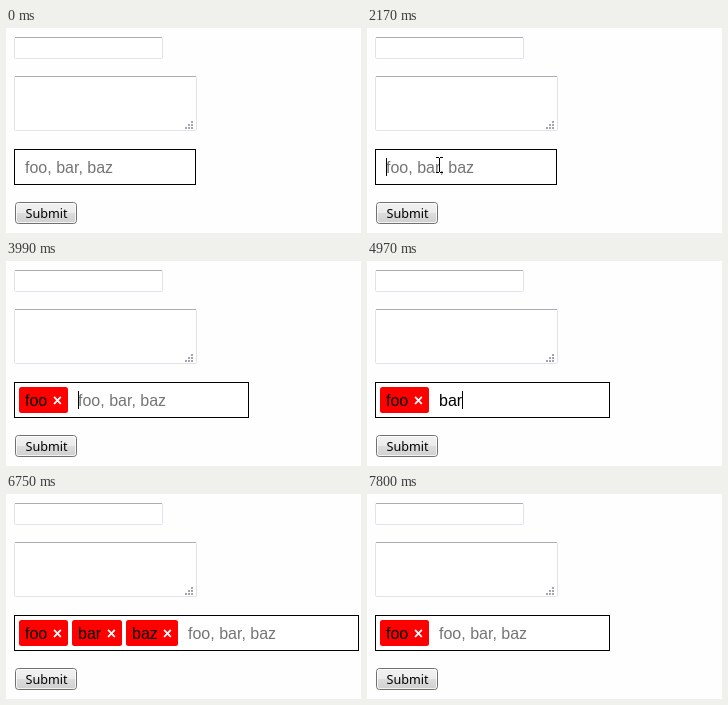
Recreate the animation shown at these times as an HTML page. Size 355x205 px, loop 8000 ms.

```html
<!DOCTYPE html>
<html lang="en">
<head>
<meta charset="utf-8">
<title>Tag input</title>
<style>
  html, body { margin: 0; width: 100%; height: 100%; overflow: hidden; background: #fefefe; }
  svg { display: block; width: 355px; height: 205px; }
  text { font: 16px "Liberation Sans", Arial, sans-serif; white-space: pre; }
  .close { font-weight: bold; fill: #fff; }
  .label { font: 12.6px "Noto Sans", sans-serif; }
  .crisp { shape-rendering: crispEdges; }
</style>
</head>
<body>
<svg viewBox="0 0 355 205">
  <defs>
    <linearGradient id="face" x2="0" y2="1">
      <stop offset="0" stop-color="#f2f2f2"/>
      <stop offset=".5" stop-color="#ebebeb"/>
      <stop offset=".5" stop-color="#dddddd"/>
      <stop offset="1" stop-color="#cfcfcf"/>
    </linearGradient>
  </defs>

  <g fill="#fff" stroke="#e2e3ea">
    <rect x="8.5" y="9.5" width="148" height="21" rx="1"/>
    <rect x="8.5" y="48.5" width="182" height="54" rx="1"/>
    <path d="M9 9.5H156M9 48.5H190" stroke="#abadb3"/>
  </g>
  <path id="grip" class="crisp" fill="#a5a5b0"/>

  <rect x="9.5" y="174.5" width="61" height="21" rx="3" fill="url(#face)" stroke="#707070"/>
  <rect x="10.5" y="175.5" width="59" height="19" rx="2" fill="none" stroke="#fff" stroke-opacity=".75"/>
  <text class="label" x="19.5" y="190">Submit</text>

  <rect id="field" class="crisp" x="8.5" y="121.5" height="35" fill="#fff" stroke="#000"/>
  <g id="tags"></g>
  <text id="entry" y="145"></text>
  <rect id="caret" class="crisp" y="130" width="1" height="18"/>

  <path id="arrow" d="M.5 .5V16.5L4.2 13L6.8 18.5L9 17.5L6.5 12H11.5Z" fill="#fff" stroke="#000"/>
  <path id="beam" class="crisp" d="M-3.5 -7.5H-.5M.5 -7.5H3.5M-3.5 7.5H-.5M.5 7.5H3.5M0 -7V7" fill="none" stroke="#000"/>
</svg>

<script>
const LOOP = 8000;
const PLACEHOLDER = 'foo, bar, baz';
const $ = id => document.getElementById(id);

const tags = [
  { name: 'foo', x: 13, width: 49 },
  { name: 'bar', x: 66, width: 50 },
  { name: 'baz', x: 120, width: 52 }
];
const entryX = [19, 72, 125.9, 182];
const fieldWidth = [181, 234, 288, 344];

// [start ms, number of tags, typed text, caret visible]
const states = [
  [0, 0, '', false], [2170, 0, '', true], [2700, 0, '', false], [3190, 0, '', true],
  [3370, 0, 'f', true], [3620, 0, 'fo', true], [3680, 0, 'foo', true],
  [3990, 1, '', true], [4550, 1, '', false],
  [4730, 1, 'b', true], [4850, 1, 'ba', true], [4970, 1, 'bar', true],
  [5180, 2, '', true],
  [5550, 2, 'b', true], [5610, 2, 'ba', true], [5980, 2, 'baz', true],
  [6260, 3, '', true], [6750, 3, '', false],
  [7320, 2, '', true], [7800, 1, '', false]
];

$('tags').innerHTML = tags.map(({ name, x, width }) => `<g>
  <rect x="${x}" y="126" width="${width}" height="26" rx="2.5" fill="#f00"/>
  <text x="${x + 6}" y="145">${name}</text>
  <text class="close" x="${x + width - 15.3}" y="145">×</text></g>`).join('');

let dots = '';
for (let row = 0; row < 3; row++)
  for (let col = 2 - row; col < 3; col++)
    dots += `M${179 + col * 3} ${93 + row * 3}h2v2h-2z`;
$('grip').setAttribute('d', dots);

function pointerAt(t) {
  if (t < 810 || t >= 2520) return null;
  if (t >= 2460) return [123, 181];
  if (t >= 2400) return [96, 160];
  const u = Math.min(12, Math.floor((t - 810) / 60)) / 12;
  const rest = 47 * (1 - u) ** 2;
  return [Math.round(72 + rest), Math.round(137 + rest - 14 * Math.sin(Math.PI * u))];
}

function show(element, visible) {
  element.setAttribute('visibility', visible ? 'visible' : 'hidden');
}

function drawPointer(t) {
  const position = pointerAt(t);
  const inside = position && position[1] < 149;
  show($('arrow'), position && !inside);
  show($('beam'), inside);
  if (position) $(inside ? 'beam' : 'arrow').setAttribute('transform', `translate(${position})`);
}

function drawField(t) {
  const [, count, typed, caretOn] = states.findLast(state => state[0] <= t);
  const entry = $('entry');
  $('field').setAttribute('width', fieldWidth[count]);
  [...$('tags').children].forEach((tag, i) => show(tag, i < count));
  entry.textContent = typed || PLACEHOLDER;
  entry.setAttribute('fill', typed ? '#000' : '#757575');
  entry.setAttribute('x', entryX[count]);
  const typedWidth = typed ? entry.getComputedTextLength() : 0;
  $('caret').setAttribute('x', Math.floor(entryX[count] + typedWidth));
  show($('caret'), caretOn);
}

function frame() {
  const t = performance.now() % LOOP;
  drawField(t);
  drawPointer(t);
  requestAnimationFrame(frame);
}
frame();
</script>
</body>
</html>
```
